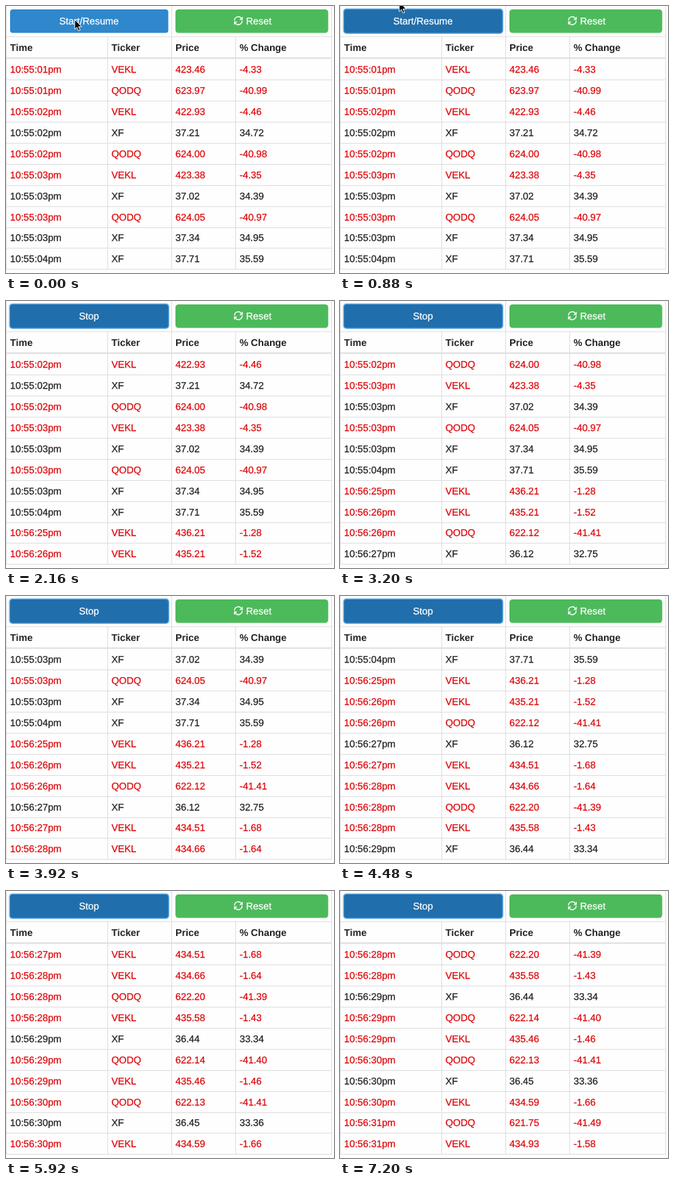
An HTML page for the animation above (7360 ms loop, 482 by 392 pixels).

```html
<!DOCTYPE html>
<html lang="en">
<head>
<meta charset="utf-8">
<title>Ticker table</title>
<style>
  html, body { margin: 0; width: 100%; height: 100%; overflow: hidden; background: #fefefe; }
  svg { display: block; width: 482px; height: 392px; }
  text {
    font: 14.3px "Liberation Sans", Arial, sans-serif;
    text-rendering: geometricPrecision;
    fill: currentColor; stroke: currentColor; stroke-width: .25px; color: #222;
  }
  .head { font-weight: bold; stroke: none; }
  .loss { color: #de080c; }
  .label { color: #fff; }
  .grid { stroke: #ddd; fill: none; }
  #ring { fill: #66afe9; filter: blur(.7px); }
</style>
</head>
<body>
<svg id="stage" viewBox="0 0 482 392">
  <g id="grid"></g>
  <rect id="ring" x="4.5" y="3.5" width="235.5" height="37.5" rx="5"/>
  <rect id="toggle" x="6" y="5" width="232.5" height="34.5" rx="4"/>
  <text id="caption" class="label" x="122" y="27.4" text-anchor="middle"></text>
  <rect x="249" y="5" width="224.5" height="34.5" rx="4.5" fill="#4cba5a"/>
  <g id="arrow">
    <path d="M335.8 21.6A5.6 5.6 0 0 1 345.6 17.7" fill="none" stroke="#fff" stroke-width="1.4"/>
    <path d="M347.8 15.4V20.4H342.8Z" fill="#fff"/>
  </g>
  <use href="#arrow" transform="rotate(180 341.4 21.6)"/>
  <text class="label" x="352.8" y="27.4">Reset</text>
  <g id="cells"></g>
  <path id="cursor" d="M0 0V14.2L3.3 11.2L5.6 16.4L8 15.4L5.7 10.3H10.2Z"
        fill="#000" stroke="#fff" stroke-width="1"/>
</svg>
<script>
const LOOP = 7360, VISIBLE = 10, PITCH = 30.9;
const COLUMNS = [6, 155, 249, 343.2];
const byId = id => document.getElementById(id);

// minute:second, ticker, price, change
const quotes = `55:01 VEKL 423.46 -4.33
55:01 QODQ 623.97 -40.99
55:02 VEKL 422.93 -4.46
55:02 XF 37.21 34.72
55:02 QODQ 624.00 -40.98
55:03 VEKL 423.38 -4.35
55:03 XF 37.02 34.39
55:03 QODQ 624.05 -40.97
55:03 XF 37.34 34.95
55:04 XF 37.71 35.59
56:25 VEKL 436.21 -1.28
56:26 VEKL 435.21 -1.52
56:26 QODQ 622.12 -41.41
56:27 XF 36.12 32.75
56:27 VEKL 434.51 -1.68
56:28 VEKL 434.66 -1.64
56:28 QODQ 622.20 -41.39
56:28 VEKL 435.58 -1.43
56:29 XF 36.44 33.34
56:29 QODQ 622.14 -41.40
56:29 VEKL 435.46 -1.46
56:30 QODQ 622.13 -41.41
56:30 XF 36.45 33.36
56:30 VEKL 434.59 -1.66
56:31 QODQ 621.75 -41.49
56:31 VEKL 434.93 -1.58`.split("\n").map(line => {
  const [time, ...rest] = line.split(" ");
  return [`10:${time}pm`, ...rest];
});

// Times at which one more quote arrives
const arrivals = [1360, 1760, 2400, 2800, 3440, 3840, 4000, 4240, 4400,
                  4640, 4880, 5360, 5600, 5840, 6880, 7120];
const PRESSED = 80, STARTED = 1360;
const cursorSteps = [[0, 101, 20], [480, 98, 14], [720, 92, 2],
                     [880, 87, -6], [960, 84, -14], [1040, 80, -40]];

function add(parent, tag, attributes) {
  const node = document.createElementNS("http://www.w3.org/2000/svg", tag);
  for (const name in attributes) node.setAttribute(name, attributes[name]);
  return byId(parent).appendChild(node);
}

function line(d, width = 1) {
  add("grid", "path", { d, class: "grid", "stroke-width": width });
}

line("M.5 0V386.5M478.5 0V386.5M243.5 0V386.5M149.5 45V386.5M337.5 45V386.5");
line("M0 45H479");
line("M0 76.5H479", 2);
for (let i = 1; i <= VISIBLE; i++) line(`M0 ${Math.round(77.3 + i * PITCH) + .5}H479`);

["Time", "Ticker", "Price", "% Change"].forEach((title, i) => {
  add("cells", "text", { x: COLUMNS[i], y: 66.3, class: "head" }).textContent = title;
});
const rows = Array.from({ length: VISIBLE }, (_, i) =>
  COLUMNS.map(x => add("cells", "text", { x, y: 98.2 + i * PITCH })));

let shown = -1;
function showQuotes(first) {
  if (first === shown) return;
  shown = first;
  rows.forEach((cells, i) => {
    const quote = quotes[first + i];
    cells.forEach((cell, j) => {
      cell.textContent = quote[j];
      cell.setAttribute("class", quote[3] < 0 ? "loss" : "");
    });
  });
}

function render(t) {
  const pressed = t >= PRESSED;
  byId("ring").style.display = pressed ? "" : "none";
  byId("toggle").setAttribute("fill", pressed ? "#206eab" : "#2f87cc");
  byId("caption").textContent = t < STARTED ? "Start/Resume" : "Stop";
  const [, x, y] = cursorSteps.filter(step => step[0] <= t).pop();
  byId("cursor").setAttribute("transform", `translate(${x} ${y})`);
  showQuotes(arrivals.filter(time => time <= t).length);
}

const start = performance.now();
function tick() {
  render((performance.now() - start) % LOOP);
  requestAnimationFrame(tick);
}
tick();
</script>
</body>
</html>
```
